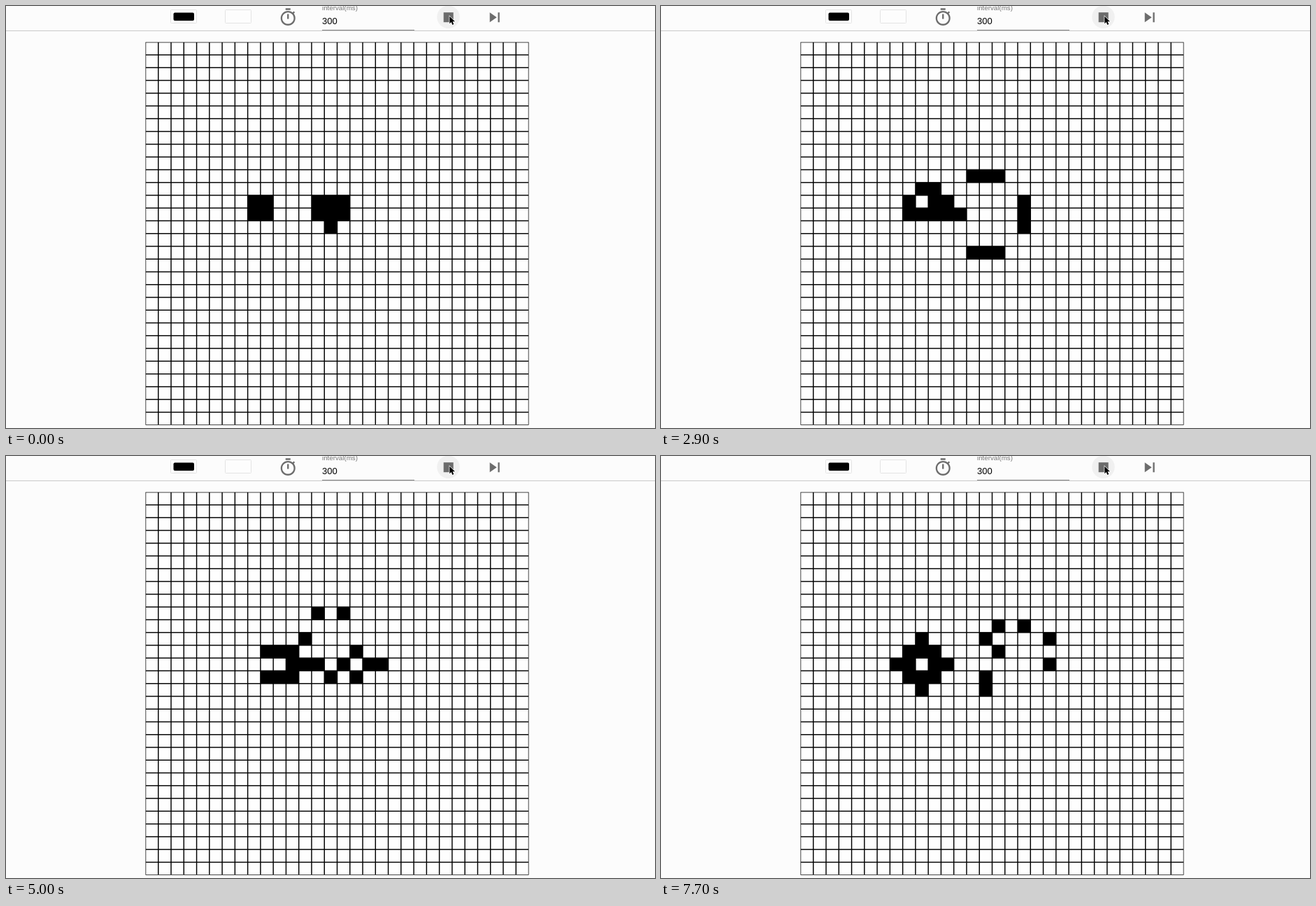
An HTML page with a canvas that plays this animation: 928 by 604 pixels, repeating every 8000 ms.

```html
<!DOCTYPE html>
<html lang="en">
<head>
<meta charset="utf-8">
<title>Game of Life</title>
<style>
  html, body { margin: 0; width: 100%; height: 100%; overflow: hidden; background: #fcfcfc; }
  canvas, svg { position: absolute; left: 0; top: 0; display: block; }
  text { font-family: "Liberation Sans", Arial, sans-serif; }
</style>
</head>
<body>
<canvas id="board" width="928" height="604"></canvas>
<svg width="928" height="604" viewBox="0 0 928 604">
  <rect y="35" width="928" height="1" fill="#c9c9c9"/>
  <g fill="#fdfdfd" stroke="#e4e4e4">
    <rect x="235.5" y="5.5" width="37" height="19" rx="1"/>
    <rect x="313.5" y="5.5" width="37" height="19" rx="1"/>
  </g>
  <rect x="239.5" y="9.5" width="29.5" height="11.5" rx="2"/>
  <text x="452" y="6" font-size="9.75" fill="#757575">interval(ms)</text>
  <text x="452" y="25.7" font-size="13">300</text>
  <rect x="452" y="34" width="132" height="1" fill="#858585"/>
  <circle cx="632.5" cy="15.8" r="16.2" fill="#f0f0f0"/>
  <g fill="#6c6c6c">
    <path transform="translate(389.2 2.2) scale(1.17)" d="M15 1H9v2h6V1zm-4 13h2V8h-2v6zm8.03-6.61l1.42-1.42c-.43-.51-.9-.99-1.41-1.41l-1.42 1.42C16.07 4.74 14.12 4 12 4c-4.97 0-9 4.03-9 9s4.02 9 9 9 9-4.03 9-9c0-2.12-.74-4.07-1.97-5.61zM12 20c-3.87 0-7-3.13-7-7s3.13-7 7-7 7 3.13 7 7-3.13 7-7 7z"/>
    <rect x="625.7" y="9.2" width="14" height="14"/>
    <path transform="translate(684.7 2.2) scale(1.17)" d="M6 18l8.5-6L6 6v12zM16 6v12h2V6h-2z"/>
  </g>
  <path transform="translate(634.3 14.8)" d="M0 0V10.5l2.4-2.3 1.6 3.9 2-.8-1.7-3.8h3.4z" stroke="#fff" stroke-width="1.4" paint-order="stroke"/>
</svg>
<script>
const SIZE = 30, LEFT = 199.5, TOP = 51.7, CELL = 548 / SIZE, LINE = 0.73;
const STEP = 300, FIRST = 200, LOOP = 8000;
const ctx = document.getElementById('board').getContext('2d');

const emptyGrid = () => Array.from({ length: SIZE }, () => Array(SIZE).fill(0));

function neighbours(grid, x, y) {
  let n = -grid[y][x];
  for (let j = y - 1; j <= y + 1; j++)
    for (let i = x - 1; i <= x + 1; i++) n += grid[j]?.[i] || 0;
  return n;
}

function evolve(grid) {
  return grid.map((row, y) => row.map((alive, x) => {
    const n = neighbours(grid, x, y);
    return n === 3 || (alive && n === 2) ? 1 : 0;
  }));
}

function draw(grid) {
  ctx.clearRect(0, 0, 928, 604);
  ctx.fillStyle = '#000';
  ctx.fillRect(LEFT, TOP, SIZE * CELL, SIZE * CELL);
  ctx.fillStyle = '#fefefe';
  grid.forEach((row, y) => row.forEach((alive, x) => {
    if (!alive) ctx.fillRect(LEFT + x * CELL + LINE, TOP + y * CELL + LINE, CELL - 2 * LINE, CELL - 2 * LINE);
  }));
}

const seed = emptyGrid();
for (const y of [12, 13])
  for (const x of [8, 9, 13, 14, 15]) seed[y][x] = 1;
seed[14][14] = 1;

const generations = [seed];
while (FIRST + (generations.length - 1) * STEP < LOOP)
  generations.push(evolve(generations[generations.length - 1]));

const start = performance.now();
let shown = -1;

function tick() {
  const t = (performance.now() - start) % LOOP;
  const n = Math.floor((t - FIRST) / STEP) + 1;
  if (n !== shown) draw(generations[shown = n]);
  requestAnimationFrame(tick);
}
tick();
</script>
</body>
</html>
```
